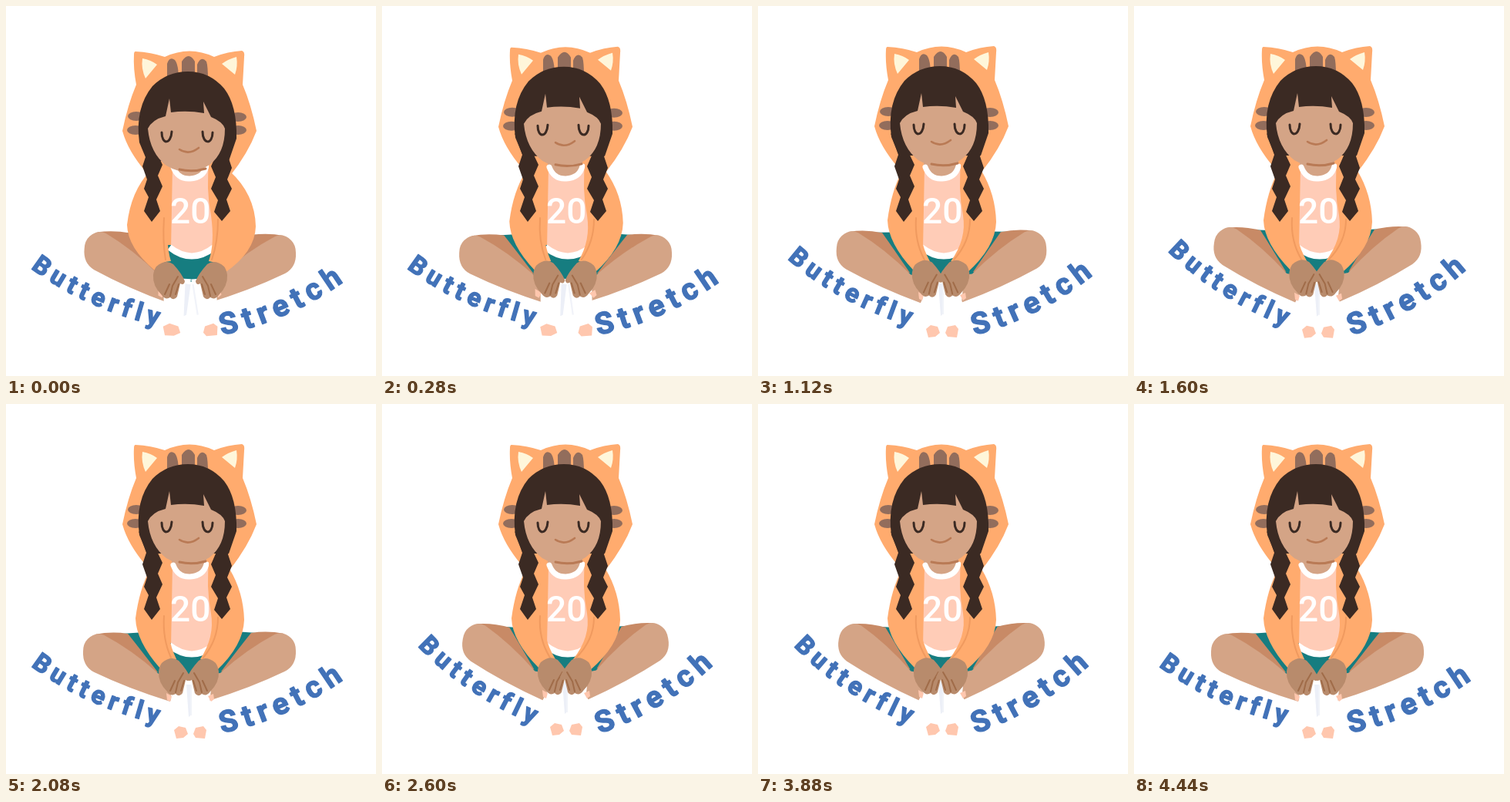
Recreate the animation shown at these times as an HTML page. Size 480 px wide and 480 px high, loop 6.72 s.

```html
<!DOCTYPE html>
<html lang="en">
<head>
<meta charset="utf-8">
<title>Butterfly Stretch</title>
<style>
html, body { margin: 0; width: 100%; height: 100%; overflow: hidden; background: #fff; }
svg { display: block; width: 100vw; height: 100vh; }
.orange { fill: #ffab6e; }
.skin { fill: #d4a486; }
.thigh { fill: #c88a66; }
.hand { fill: #b88b6c; }
.hair { fill: #3b2a23; }
.teal { fill: #167d80; }
.toe { fill: #ffc7ae; }
.stripe { fill: #926d5c; }
.line { fill: none; stroke-linecap: round; stroke-linejoin: round; }
.fold { stroke: #f09a5f; stroke-width: 2; }
.finger { stroke: #a06c49; stroke-width: 2; }
.label { fill: #4272b8; stroke: #4272b8; stroke-width: 1.4; stroke-linejoin: round; font-family: Roboto, Inter, sans-serif; font-weight: 700; }
.number { fill: #fff; font: 500 46px Roboto, "Liberation Sans", sans-serif; }
</style>
</head>
<body>
<svg viewBox="0 0 480 480" xmlns="http://www.w3.org/2000/svg">
  <defs>
    <path id="arcL" d="M32 340 Q105 396 215 419"/>
    <path id="arcR" d="M280 427 Q372 408 452 348"/>
    <g id="leg">
      <path class="teal" d="M150 298 L180 296 L245 280 V357 H200Z"/>
      <path class="thigh" d="M116 299 Q136 295 158 298 Q174 318 197 348 L180 346Z"/>
      <path class="skin" d="M106 305 Q116 295 127 300 Q163 319 198 350 L226 352 L213 386 Q160 370 114 348 Q99 340 100 321 Q100 311 106 305Z"/>
    </g>
    <g id="hand">
      <path class="hand" d="M202 336 Q214 326 224 333 Q235 345 239 355 Q238 361 233 358 L229 375 Q225 381 220 376 Q214 380 209 373 Q197 361 198 347 Q199 340 202 336Z"/>
      <path class="line finger" d="M230 349 L223 361 L220 374 M219 359 L213 372 M231 359 L227 372"/>
    </g>
  </defs>

  <g id="hood">
    <path class="orange" d="M168 53 Q188 54 206 60 Q238 45 270 60 Q288 53 306 52 Q310 53 309 60 L307 96 Q318 122 325 156 Q314 185 291 214 L182 210 Q158 182 151 156 Q158 122 169 96 Q165 75 166 57 Q166 53 168 53Z"/>
    <path fill="#fff6da" d="M177 62 Q188 64 196 70 L181 88 Q175 75 177 62Z M299 60 Q288 63 280 69 L297 83 Q301 72 299 60Z"/>
    <path class="stripe" d="M209 90 V69 Q212 59 219 64 Q224 70 224 90Z M228 90 V66 Q237 52 245 66 V90Z M248 90 V70 Q253 58 260 66 Q262 72 262 90Z"/>
    <g class="stripe">
      <ellipse cx="169" cy="137" rx="11" ry="6"/><ellipse cx="168" cy="155" rx="11" ry="6"/>
      <ellipse cx="301" cy="138" rx="11" ry="6"/><ellipse cx="301" cy="155" rx="11" ry="6"/>
    </g>
  </g>

  <g id="legL"><use href="#leg"/></g>
  <g transform="translate(476 -1) scale(-1 1)"><g id="legR"><use href="#leg"/></g></g>

  <path class="orange" d="M190 205 H285 L276 310 H205Z"/>
  <path fill="#ffccb7" d="M216 209 H262 L272 300 Q270 314 266 316 Q242 332 214 315Z"/>
  <path class="line" stroke="#fff" stroke-width="8" style="stroke-linecap:butt" d="M212 313 Q241 336 270 313"/>
  <path class="skin" d="M215 198 H260 V207 Q256 220 238 221 Q221 220 215 207Z"/>
  <path class="line" stroke="#fff" stroke-width="7" d="M217 209 Q223 225 239 224 Q256 223 260 208"/>
  <text class="number" x="213" y="282">20</text>

  <g id="footL">
    <path fill="#fff" d="M212 360 L239 357 V405 Q236 424 231 427 H219Z"/>
    <path fill="#eceff7" d="M234 364 H239.5 V404 L237 406Z"/>
    <path class="toe" d="M218 423 L224 418 L233 420 L236 428 L230 433 L221 434Z M208 375 L215 379 L213 386 L209 384Z"/>
  </g>
  <g id="footR">
    <path fill="#fff" d="M267 360 L239 357 V405 Q241 424 246 427 H260Z"/>
    <path fill="#f1f3f9" d="M239 364 H241 V404 H239Z"/>
    <path class="toe" d="M260 423 L256 418 L246 420 L243 428 L246 433 L258 434Z M262 379 L269 376 L270 383 L266 386Z"/>
  </g>

  <path id="sleeveL" class="orange"/>
  <path id="sleeveR" class="orange"/>
  <path id="foldL" class="line fold"/>
  <path id="foldR" class="line fold"/>
  <g id="handL"><use href="#hand"/></g>
  <g id="handR"><use href="#hand" transform="translate(474 0) scale(-1 1)"/></g>

  <path class="hair" d="M172 165 L182 193 L177 208 L183 225 L179 237 L185 248 L179 266 L189 280 L200 266 L195 251 L203 234 L197 220 L203 206 L193 185Z"/>
  <path class="hair" d="M299 162 L288 195 L293 210 L287 225 L293 237 L286 251 L291 266 L280 279 L270 267 L275 252 L266 237 L272 222 L266 208 L276 185Z"/>
  <g id="hair">
    <path class="hair" d="M173 170 Q167 125 190 97 Q209 78 236 78 Q264 78 283 100 Q300 122 299 165 L289 194 H183Z"/>
    <path class="skin" d="M184 152 Q190 140 207 136 L212 113 L214 131 Q235 128 257 132 L256 117 L266 137 Q281 143 284 152 Q284 184 264 199 Q237 217 208 200 Q187 184 184 152Z"/>
    <path class="line" stroke="#b97a55" stroke-width="3" d="M225 205 Q242 209 259 204"/>
  </g>
  <g id="face" class="line">
    <path stroke="#3b2a23" stroke-width="3" d="M202 154 C202 170 214 170 215 153 M255 153 C255 170 268 170 268 154"/>
    <path stroke="#b97a55" stroke-width="2.600" d="M225 176 Q237 184 250 174"/>
  </g>

  <g id="labelL"><text class="label" font-size="33" letter-spacing="6.600"><textPath href="#arcL">Butterfly</textPath></text></g>
  <g id="labelR"><text class="label" font-size="39" letter-spacing="7.700"><textPath href="#arcR">Stretch</textPath></text></g>
</svg>

<script>
const LOOP = 6720, STEP = 40, FLAP_START = 840, FLAP = 1200, FLAP_END = 4440;
const $ = id => document.getElementById(id);
const set = (id, name, value) => $(id).setAttribute(name, value);
const move = (id, value) => set(id, 'transform', value);

// 1 before `from`, 0 after `to`, smooth in between
function fade(t, from, to) {
  const k = Math.min(1, Math.max(0, (t - from) / (to - from)));
  return (1 + Math.cos(Math.PI * k)) / 2;
}

function drawSleeves(out, reachL, reachR) {
  const l = -11 * out, r = 15 * out, d = 6 * out;
  const wl = 200 + reachL, wr = 273 - reachR;
  set('sleeveL', 'd', `M183 200 L187 214 Q${173 + l} 240 ${168 + l} ${278 + d}
    Q${169 + l} ${308 + d} ${wl} 343 Q${wl + 8} 331 ${wl + 21} 331
    Q206 ${300 + d} 213 270 Q218 235 205 200Z`);
  set('sleeveR', 'd', `M292 200 L290 214 Q${308 + r} 244 ${309 + r} ${280 + d}
    Q${308 + r} ${313 + d} ${wr} 346 Q${wr - 8} 332 ${wr - 21} 331
    Q271 ${302 + d} 266 272 Q259 235 264 200Z`);
  set('foldL', 'd', `M205 275 Q203 305 ${wl + 14} 329`);
  set('foldR', 'd', `M275 277 Q275 306 ${wr - 17} 329`);
}

// widens a foot away from its inner edge, then turns it at the ankle
function moveFoot(id, dx, dy, turn, ankle, widen, inner) {
  move(id, `translate(${dx} ${dy}) rotate(${turn} ${ankle} 365)
    translate(${inner} 0) scale(${widen} 1) translate(${-inner} 0)`);
}

function render(t) {
  const lean = fade(t, 0, 360);
  const out = fade(t, 0, 420);
  const apart = fade(t, 160, 720);
  const active = t > FLAP_START && t < FLAP_END;
  const flap = active ? (1 - Math.cos(2 * Math.PI * (t - FLAP_START) / FLAP)) / 2 : 0;
  const lift = t < FLAP_START + FLAP / 2 ? 1 : flap;

  move('hood', `translate(0 ${6 * lean})`);
  move('hair', `translate(0 ${7 * lean})`);
  move('face', `translate(0 ${10 * lean})`);

  move('legL', `rotate(${7.5 * flap + 3 * lean} 225 350)`);
  move('legR', `rotate(${7.5 * flap} 225 350)`);

  const reachL = 4 * flap - 7 * out;
  const reachR = 4 * flap - 11 * out;
  drawSleeves(out, reachL, reachR);
  move('handL', `translate(${reachL} ${2 * out - flap})`);
  move('handR', `translate(${-reachR} ${2 * out - flap})`);

  const dy = -4 * lift;
  moveFoot('footL', -apart, dy, 8 * apart, 232, 1 + 0.3 * apart, 236);
  moveFoot('footR', 3 * apart, dy, -9 * apart, 247, 1 + 0.15 * apart, 243);

  move('labelL', `rotate(${9.7 * flap} 195 412)`);
  move('labelR', `rotate(${-7.5 * flap} 286 410)`);
}

function tick() {
  const t = performance.now() % LOOP;
  render(Math.floor(t / STEP) * STEP);
  requestAnimationFrame(tick);
}
render(0);
requestAnimationFrame(tick);
</script>
</body>
</html>
```
